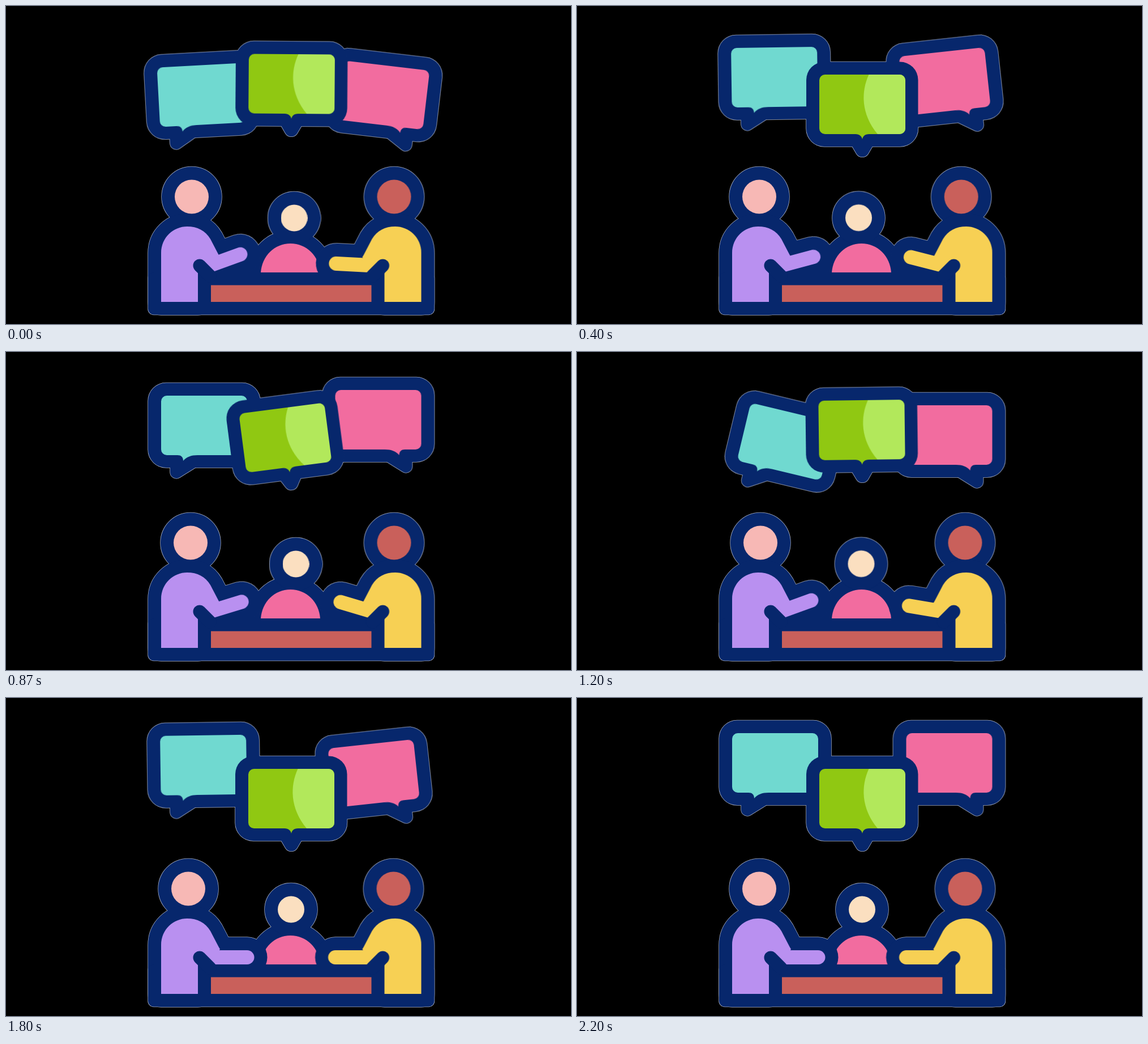
These frames come from a looping animation (998 px wide and 561 px high, 2.27 s). An HTML page:

```html
<!DOCTYPE html>
<html lang="en">
<head>
<meta charset="utf-8">
<title>Discussion</title>
<style>
  html, body { margin: 0; width: 100%; height: 100%; overflow: hidden; background: #000; }
  svg { display: block; width: 100%; height: 100%; }

  .rim { --rim: 1.5px; fill: #a6aec2; stroke: #a6aec2; }
  .ink { --rim: 0px; fill: #07276c; stroke: #07276c; }
  .edge { stroke-width: var(--rim); }
  .torso-edge { stroke-width: calc(46px + var(--rim)); stroke-linejoin: round; }
  .arm-edge { stroke-width: calc(71px + var(--rim)); stroke-linecap: round; }
  .arm-fill { stroke-width: 25px; stroke-linecap: round; }
  .notch { stroke: #07276c; stroke-width: 23px; stroke-linecap: round; }

  /* The clock in --t moves every paused animation along. */
  .move { animation: 2.26667s linear calc(var(--t, 0) * -1s) infinite paused; }
  .bubble-l { animation-name: bubble-l; transform-origin: 301px 200px; }
  .bubble-r { animation-name: bubble-r; transform-origin: 301px 191px; }
  .bubble-c { animation-name: bubble-c; transform-origin: 504px 260px; }
  .head-l { animation-name: head-l; animation-timing-function: ease-in-out; }
  .head-r { animation-name: head-r; animation-timing-function: ease-in-out; }
  .head-c { animation-name: head-c; animation-timing-function: ease-in-out; }
  .arm-l { animation-name: arm-l; transform-origin: 365px 482px; }
  .arm-r { animation-name: arm-r; transform-origin: 365px 482px; }

  @keyframes bubble-l {
    0% { transform: translateY(45px) rotate(-3.1deg); }
    5.88% { transform: translateY(37px) rotate(-3.6deg); }
    17.65% { transform: translateY(11.7px) rotate(-.8deg); }
    27.9% { transform: translateY(3px) rotate(0deg); }
    38.24% { transform: translateY(15px) rotate(0deg); }
    45.6% { transform: translateY(24px) rotate(7deg); }
    52.94% { transform: translateY(30px) rotate(13.5deg); }
    60.3% { transform: translateY(41px) rotate(1deg); }
    63.8% { transform: translateY(38px) rotate(-4deg); }
    67.65% { transform: translateY(31px) rotate(-3.1deg); }
    79.41% { transform: translateY(4.5px) rotate(-.8deg); }
    88.2%, 100% { transform: translateY(0px) rotate(0deg); }
  }
  /* Runs inside a mirrored group. */
  @keyframes bubble-r {
    0%, 61.76% { transform: translateY(48px) rotate(-6.7deg); }
    5.88%, 67.65% { transform: translateY(51px) rotate(-13.3deg); }
    11.76%, 73.53% { transform: translateY(34px) rotate(-2deg); }
    17.65%, 79.41% { transform: translateY(13px) rotate(6.2deg); }
    25%, 86.8% { transform: translateY(3px) rotate(1.5deg); }
    32.35% { transform: translateY(0px) rotate(0deg); }
    38.24% { transform: translateY(5px) rotate(0deg); }
    52.94% { transform: translateY(32px) rotate(0deg); }
    94.1%, 100% { transform: translateY(0px) rotate(0deg); }
  }
  @keyframes bubble-c {
    0% { transform: translateY(-40px) rotate(.4deg); }
    8.82% { transform: translateY(-22px) rotate(.3deg); }
    17.65% { transform: translateY(-4px) rotate(0deg); }
    23.53% { transform: translateY(0px) rotate(0deg); }
    30.9% { transform: translateY(-9px) rotate(-4deg); }
    38.24% { transform: translateY(-27px) rotate(-7.4deg); }
    44.12% { transform: translateY(-38px) rotate(-4deg); }
    49.1% { transform: translateY(-42px) rotate(-1.5deg); }
    52.94% { transform: translateY(-40px) rotate(-.7deg); }
    60.3% { transform: translateY(-27px) rotate(.1deg); }
    67.65% { transform: translateY(-11px) rotate(.3deg); }
    77.4%, 100% { transform: translateY(0px) rotate(0deg); }
  }
  @keyframes head-l {
    0% { transform: translateX(6px); }
    17.65% { transform: translateX(0px); }
    38.24% { transform: translateX(4px); }
    52.94% { transform: translateX(2px); }
    67.65% { transform: translateX(5px); }
    79.41%, 100% { transform: translateX(0px); }
  }
  @keyframes head-r {
    0% { transform: translateX(0px); }
    17.65% { transform: translateX(6.8px); }
    38.24%, 52.94% { transform: translateX(0px); }
    67.65% { transform: translateX(7.3px); }
    79.41% { transform: translateX(1px); }
    97.06%, 100% { transform: translateX(0px); }
  }
  @keyframes head-c {
    0% { transform: translate(5.5px, 1px); }
    17.65% { transform: translate(-6px, .6px); }
    38.24% { transform: translate(8.5px, 1px); }
    52.94% { transform: translate(-1.5px, .6px); }
    67.65% { transform: translate(-1.3px, .3px); }
    79.41%, 100% { transform: translate(0px, 0px); }
  }
  @keyframes arm-l {
    0% { transform: rotate(-20deg); }
    17.65% { transform: rotate(-15deg); }
    38.24% { transform: rotate(-17deg); }
    52.94% { transform: rotate(-20deg); }
    67.65% { transform: rotate(-6deg); }
    79.41%, 100% { transform: rotate(0deg); }
  }
  @keyframes arm-r {
    0% { transform: rotate(-3deg); }
    17.65% { transform: rotate(-14.3deg); }
    27.9% { transform: rotate(-18deg); }
    38.24% { transform: rotate(-16.5deg); }
    52.94% { transform: rotate(-9.5deg); }
    67.65% { transform: rotate(-1.3deg); }
    76%, 100% { transform: rotate(0deg); }
  }
</style>
</head>
<body>
<svg viewBox="0 0 998 561" preserveAspectRatio="none">
  <defs>
    <g id="side-edge" class="edge">
      <path d="M290 180V197A11 11 0 0 0 307 206L336 188V180Z"/>
      <rect x="251" y="39.5" width="198" height="149.5" rx="32"/>
    </g>
    <path id="side-fill" d="M284 62H416A10 10 0 0 1 426 72V157A10 10 0 0 1 416 167H338C327 167 319 170 313 177C313 170 309 167 303 167H284A10 10 0 0 1 274 157V72A10 10 0 0 1 284 62Z"/>
    <g id="mid-edge" class="edge">
      <path d="M484 248L494 265A12 12 0 0 0 514 265L524 248Z"/>
      <rect x="405" y="102.5" width="197.5" height="149.5" rx="32"/>
    </g>
    <path id="mid-fill" d="M438 125H570A10 10 0 0 1 580 135V220A10 10 0 0 1 570 230H516C508 230 505 234 504 239C503 234 499 230 492 230H438A10 10 0 0 1 428 220V135A10 10 0 0 1 438 125Z"/>
    <path id="shine" d="M515.5 125C501.5 155 501.5 195 531 230H570A10 10 0 0 0 580 220V135A10 10 0 0 0 570 125Z"/>
    <path id="torso" d="M274 522V436C274 408 296 389 320 389C338 389 352 396 361 411L373 434Q376 440 378 443L364 468H339V522Z"/>
    <path id="arm" d="M366 457.5H426"/>
    <path id="dome" d="M450 470.5C452 441 474 419 502.5 419S553 441 555 470.5Z"/>
    <circle id="head-edge" class="edge" cx="322" cy="336.5" r="53"/>
    <circle id="head-fill" cx="322" cy="336.5" r="30"/>
    <circle id="small-edge" class="edge" cx="503.5" cy="373" r="46.5"/>
    <rect id="base" class="edge" x="251" y="470" width="505.5" height="74.5" rx="10"/>
  </defs>

  <!-- thin light rim behind all outlines -->
  <g class="rim">
    <use href="#side-edge" class="move bubble-l"/>
    <g transform="translate(1007.5) scale(-1 1)">
      <use href="#side-edge" class="move bubble-r"/>
      <use href="#head-edge" class="move head-r"/>
      <use href="#torso" class="torso-edge"/>
      <use href="#arm" class="move arm-r arm-edge"/>
    </g>
    <use href="#mid-edge" class="move bubble-c"/>
    <use href="#head-edge" class="move head-l"/>
    <use href="#torso" class="torso-edge"/>
    <use href="#arm" class="move arm-l arm-edge"/>
    <use href="#small-edge" class="move head-c"/>
    <use href="#dome" class="torso-edge"/>
    <use href="#base"/>
  </g>

  <!-- bubbles -->
  <g class="move bubble-l">
    <use href="#side-edge" class="ink"/>
    <use href="#side-fill" fill="#70d9d0"/>
  </g>
  <g transform="translate(1007.5) scale(-1 1)">
    <g class="move bubble-r">
      <use href="#side-edge" class="ink"/>
      <use href="#side-fill" fill="#f26c9f"/>
    </g>
  </g>
  <g class="move bubble-c">
    <use href="#mid-edge" class="ink"/>
    <use href="#mid-fill" fill="#90c812"/>
    <use href="#shine" fill="#b2e85b"/>
  </g>

  <!-- person in the middle -->
  <g class="ink">
    <use href="#dome" class="torso-edge"/>
    <use href="#small-edge" class="move head-c"/>
  </g>
  <use href="#dome" fill="#f26c9f"/>
  <circle class="move head-c" cx="503.5" cy="373" r="23.5" fill="#fbdfc0"/>

  <!-- outlines of the outer people and the table -->
  <g class="ink">
    <use href="#head-edge" class="move head-l"/>
    <use href="#torso" class="torso-edge"/>
    <use href="#arm" class="move arm-l arm-edge"/>
    <g transform="translate(1007.5) scale(-1 1)">
      <use href="#head-edge" class="move head-r"/>
      <use href="#torso" class="torso-edge"/>
      <use href="#arm" class="move arm-r arm-edge"/>
    </g>
    <use href="#base"/>
  </g>

  <!-- fills -->
  <use href="#head-fill" class="move head-l" fill="#f7b8b5"/>
  <use href="#torso" fill="#b990f0"/>
  <use href="#arm" class="move arm-l arm-fill" stroke="#b990f0"/>
  <path class="notch" d="M342 458L360 476"/>
  <g transform="translate(1007.5) scale(-1 1)">
    <use href="#head-fill" class="move head-r" fill="#c9605b"/>
    <use href="#torso" fill="#f7d054"/>
    <use href="#arm" class="move arm-r arm-fill" stroke="#f7d054"/>
    <path class="notch" d="M342 458L360 476"/>
  </g>
  <rect x="362" y="492.5" width="283.5" height="29.5" fill="#c9605b"/>
</svg>
<script>
  const LOOP = 2270, STEPS = 34, RATE = 15;
  const start = performance.now();
  const root = document.documentElement;

  function tick() {
    const ms = (performance.now() - start) % LOOP;
    const step = Math.min(STEPS - 1, Math.floor((ms + 3.4) * RATE / 1000));
    root.style.setProperty('--t', (step / RATE).toFixed(4));
    requestAnimationFrame(tick);
  }
  tick();
</script>
</body>
</html>
```
